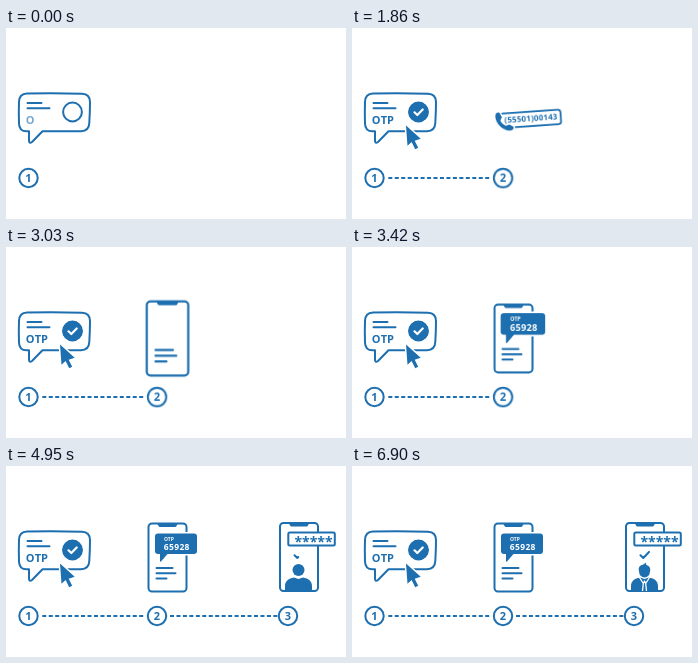
An HTML page for the animation above (6930 ms loop, 340 px wide and 191 px high).

```html
<!DOCTYPE html>
<html lang="en">
<head>
<meta charset="utf-8">
<title>OTP steps</title>
<style>
  html, body { margin: 0; width: 100%; height: 100%; overflow: hidden; background: #fff; }
  svg { display: block; width: 100%; height: 100%; --c: #1d6fb0; }
  text { font-family: "Open Sans", "Noto Sans", sans-serif; font-weight: 700; fill: var(--c); }
  .line { fill: none; stroke: var(--c); stroke-width: 2; stroke-linecap: round; stroke-linejoin: round; }
  .box { fill: #fff; }
  .fill { fill: var(--c); }
  .halo { fill: var(--c); stroke: #fff; stroke-width: 3; paint-order: stroke; stroke-linejoin: round; }
  .white { fill: none; stroke: #fff; stroke-width: 1.3; stroke-linecap: round; stroke-linejoin: round; }
  .dash { stroke: var(--c); stroke-width: 2; stroke-dasharray: 4 2.46; }
  .mid { text-anchor: middle; }
</style>
</head>
<body>
<svg viewBox="0 0 340 191">
  <defs>
    <clipPath id="screen"><rect x="275" y="58" width="36.5" height="67"/></clipPath>
    <g id="phone">
      <rect class="line box" x="-19" y="-34" width="38" height="68" rx="3.5"/>
      <path class="fill" d="M-10.5-34.5H10.5L9-31.5Q8.500-30.500 7.500-30.500H-7.500Q-8.500-30.500-9-31.500Z"/>
    </g>
    <path id="torso" class="fill" d="M279 128V120C279 115 282.500 112.500 288 111.500L292.500 113L297 111.500C302.500 112.500 306 115 306 120V128Z"/>
  </defs>

  <!-- step 1: request -->
  <path class="line" d="M21 65.500Q48 64.800 76 65.700Q84 66 84 74Q84 84 83.300 95Q83 103 75 103.300H36.500L26 114Q23 116 23 112.500V103.300H20.500Q13.200 103.300 13 95.500Q12.600 84 13 74Q13.200 65.700 21 65.500Z"/>
  <path class="line" d="M21.500 75H35.500M21.500 80.200H43.500"/>
  <text font-size="11" y="96"><tspan id="o" x="19.800">O</tspan></text>
  <text id="t" font-size="11" x="28.700" y="96">T</text>
  <text id="p" font-size="11" x="35" y="96">P</text>
  <circle class="line" cx="66.500" cy="84" r="9.400"/>
  <circle id="disc" class="fill" cx="66.500" cy="84" r="10"/>
  <path id="tick1" class="white" style="stroke-width:2.200" pathLength="1" stroke-dasharray="1 2" d="M62.500 84.300L65.300 87L70.700 81.500"/>
  <path id="cursor" class="halo" d="M54 97.500L55.500 117.800L59.600 114L63.200 121.300L66.200 119.800L62.700 112.700L68.700 110.700Z"/>

  <!-- dotted connectors -->
  <path class="dash" d="M36.300 150H137.300"/>
  <rect id="cover1" class="box" x="35" y="147" width="103" height="6"/>
  <path class="dash" d="M164 150H271.300"/>
  <rect id="cover2" class="box" x="163" y="147" width="109" height="6"/>
  <g id="badges"></g>

  <!-- step 2: call, then message -->
  <g id="call">
    <g transform="rotate(-4 181.500 90.500)">
      <rect class="line box" x="148" y="82.500" width="67" height="16" rx="3"/>
      <text class="mid" font-size="8.700" letter-spacing=".3" x="182" y="93">(55501)00143</text>
    </g>
    <path class="halo" d="M142.500 86C143 83.500 146.500 82.500 147.500 84.500L149.500 88.500C150 90 148 91 148 92.500C149 95 151.500 97 154 98.200C155.500 98.400 156.500 96.700 158 97L162 98.800C164 100 162 103 159.500 103.500C151 104.500 141 94 142.500 86Z"/>
  </g>
  <g id="phone2">
    <use href="#phone" x="161.500" y="91.500"/>
    <path class="line" d="M150.500 102H166.500M150.500 107.300H169.500M150.500 112.500H160.500"/>
  </g>
  <g id="message">
    <path class="halo" d="M152 67.500H188Q191 67.500 191 70.500V85Q191 88 188 88H161.500L155 95.500Q154 96.300 154 95V88H152Q149 88 149 85V70.500Q149 67.500 152 67.500Z"/>
    <text font-size="5" x="158" y="74.600" style="fill:#fff">OTP</text>
    <text font-size="8.500" letter-spacing=".35" x="157.800" y="84.200" style="fill:#fff">65928</text>
  </g>

  <!-- step 3: verify -->
  <g id="phone3">
    <use href="#phone" x="293" y="91"/>
    <g clip-path="url(#screen)">
      <g id="plain">
        <circle class="fill" cx="292.500" cy="104" r="6"/>
        <use href="#torso"/>
      </g>
      <g id="hat">
        <path class="fill" d="M287 103.500H298V105.500C298 109 295.500 111.500 292.500 111.500S287 109 287 105.500Z"/>
        <path class="halo" style="stroke-width:1.200" d="M288.500 97.500Q290.500 95.800 292.500 97Q295 95.500 298 96.500L299 101L302 101.300Q302.500 103 300.500 103L286 103.800Q284 103.500 284.700 102L288.300 101.600Z"/>
        <use href="#torso"/>
        <path class="white" d="M287.500 111.500L289 117L292.500 114.500L296 117L297.500 111.500"/>
      </g>
      <g id="hair">
        <ellipse class="fill" cx="292.500" cy="105.300" rx="5.500" ry="6.200"/>
        <path class="fill" d="M286.800 105Q286 99.500 290.500 98.800Q292.500 98.500 293.500 96.500Q294.500 98 294.300 99Q298.800 100 298.200 105Z"/>
        <use href="#torso"/>
        <path class="white" d="M287.500 111.500L291.300 117.500L292.500 115L293.700 117.500L297.500 111.500M291.300 117.500L290.500 125M293.700 117.500L294.500 125"/>
      </g>
    </g>
    <path id="tick2" class="line" pathLength="1" stroke-dasharray="1 2" d="M288.500 89.300L291.300 92L297 86"/>
    <rect id="field" class="line box" x="282.300" y="66.500" width="46.500" height="13" rx="1.500"/>
    <g id="stars"></g>
  </g>
</svg>
<script>
const LOOP = 6930;
const $ = id => document.getElementById(id);
const NS = 'http://www.w3.org/2000/svg';

function add(parent, tag, attrs, text = '') {
  const el = document.createElementNS(NS, tag);
  for (const k in attrs) el.setAttribute(k, attrs[k]);
  el.textContent = text;
  parent.append(el);
  return el;
}

// steps: [ms, value] pairs; the first and last values hold to the loop ends
function play(el, prop, steps, easing = 'linear') {
  const all = [[0, steps[0][1]], ...steps, [LOOP, steps[steps.length - 1][1]]];
  el.animate(all.map(([ms, v]) => ({ offset: ms / LOOP, [prop]: v, easing })),
    { duration: LOOP, iterations: Infinity });
}

function move(el, origin, steps, easing = 'ease-in-out') {
  el.style.transformOrigin = origin;
  play(el, 'transform', steps, easing);
}

const pose = (s, r = 0) => `scale(${s}) rotate(${r}deg)`;
const shift = (x, y) => `translate(${x}px, ${y}px)`;
const fade = (el, from, to) => play(el, 'opacity', [[from, 0], [to, 1]]);
const draw = (el, from, to) => {
  fade(el, from, from + 1);
  play(el, 'strokeDashoffset', [[from, 1], [to, 0]]);
};

[[22.5, 0], [151, 1440], [282, 3750]].forEach(([x, at], i) => {
  const g = add($('badges'), 'g', {});
  add(g, 'circle', { class: 'line', cx: x, cy: 150, r: 9.2 });
  add(g, 'text', { class: 'mid', x, y: 154, 'font-size': 11 }, i + 1);
  if (at) move(g, `${x}px 150px`, [[at, pose(0)], [at + 150, pose(1.08)], [at + 240, pose(1)]]);
});

for (let i = 0; i < 5; i++) {
  const star = add($('stars'), 'text', { class: 'mid', x: 292.3 + i * 7.6, y: 81.2, 'font-size': 14 }, '*');
  fade(star, 4380 + i * 90, 4440 + i * 90);
}

play($('o'), 'fillOpacity', [[0, .6], [60, 1]]);
fade($('t'), 90, 180);
fade($('p'), 210, 300);
fade($('cursor'), 240, 300);
move($('cursor'), '54px 97px', [
  [240, shift(14, 32)], [570, shift(0, 0)], [630, 'translate(0px, 0px) scale(.88)'], [720, shift(0, 0)]
]);
move($('disc'), '66.5px 84px', [[540, pose(0)], [720, pose(1)]]);
draw($('tick1'), 720, 960);

const wipe = (id, x, from, to) =>
  move($(id), `${x}px 150px`, [[from, 'scaleX(1)'], [to, 'scaleX(0)']], 'linear');
wipe('cover1', 138, 1110, 1440);
wipe('cover2', 272, 3570, 3780);

move($('call'), '152px 94px', [
  [1680, pose(0)], [1920, pose(1.03)], [2070, pose(1)], [2190, pose(1, 2)], [2310, pose(1, -2)],
  [2430, pose(1, 2)], [2550, pose(1, -1)], [2640, pose(1)], [2715, pose(1)], [2820, pose(0)]
]);
move($('phone2'), '161.5px 91.5px', [
  [2760, pose(0)], [3000, pose(1.1)], [3150, pose(1)]
]);
move($('message'), '154px 92px', [
  [3120, pose(0)], [3330, pose(1.25)], [3420, pose(1.06)], [3510, pose(1)]
]);

move($('phone3'), '293px 91px', [
  [3810, pose(0)], [3990, pose(1.08, -5)], [4110, pose(1.03, -2)], [4260, pose(1)]
]);
move($('field'), '282px 73px', [
  [3960, 'scaleX(0)'], [4110, 'scaleX(.86)'], [4230, 'scaleX(1.05)'], [4350, 'scaleX(1)']
]);
draw($('tick2'), 4860, 5070);

const UP = shift(0, 0), DOWN = shift(0, 34);
move($('plain'), '0 0', [[5130, UP], [5370, DOWN]]);
move($('hat'), '0 0', [[5340, DOWN], [5610, UP], [6090, UP], [6360, DOWN]]);
move($('hair'), '0 0', [[6360, DOWN], [6690, UP]]);
</script>
</body>
</html>
```
